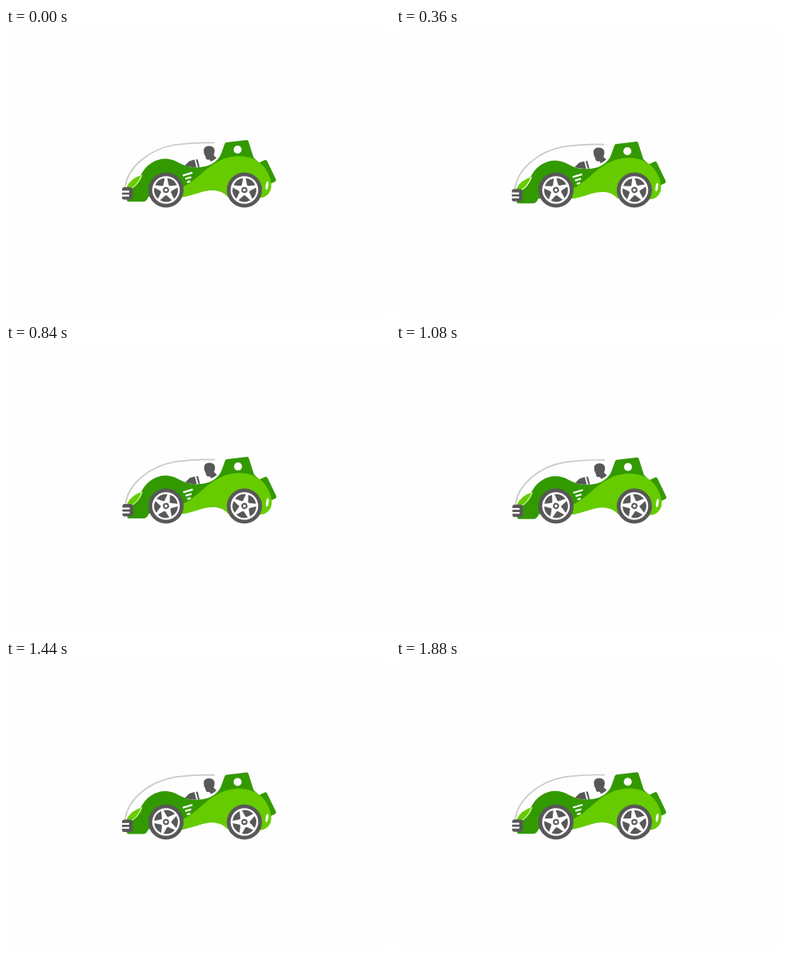
An HTML page that plays this animation: 480 by 360 pixels, repeating every 1.92 s.

```html
<!DOCTYPE html>
<html lang="en">
<head>
<meta charset="utf-8">
<title>Green car</title>
<style>
  html, body { margin: 0; width: 100%; height: 100%; overflow: hidden; background: #fefefe; }
  svg { display: block; width: 100vw; height: 100vh; }
</style>
</head>
<body>
<svg viewBox="0 0 480 360">
  <defs>
    <g id="rim">
      <circle r="17.300" fill="#fefefe"/>
      <g id="gaps" fill="#585858"></g>
      <circle r="3.800" fill="#585858"/>
      <circle r="1.800" fill="#fefefe"/>
    </g>
  </defs>

  <g id="body">
    <path fill="#339900" d="M316 168.500 L323.500 165 Q325.500 164.500 326.500 166.500 L337.300 189 Q338 191 336.500 192 L331 194.500 Z"/>
    <path fill="#339900" d="M151 215 L158 199.500 Q163 197 167 188 C173 171 187 163.500 199 163.500 C214 163.500 218 173 234 174 C254 175.500 265 167 269 157 L273.500 144.500 Q274 143.300 275.500 143 L301 140 Q302.500 140 303 141.500 L309.500 162 L316 168 L318 190 L250 203 L222 211 L178 211 Q176 217 171 217 L153 217 Q151 217 151 215 Z"/>
    <path fill="#66cc00" d="M220 199 C238 192 248 174 270 164.500 C292 156 312 161 322 173 C330 183 333 194 331 202 Q328 210 320 212 L277 211 Q271 204 261 203 C246 202 237 209 220 211.500 Z"/>
    <path fill="#66cc00" d="M150 200 Q156 187 171 183.500 Q166 197 157.500 200 Z"/>
    <path fill="none" stroke="#fefefe" d="M156.500 200.300 Q164 197.500 169.500 184"/>
    <path fill="none" stroke="#c9c9c5" stroke-width="1.700" stroke-linecap="round" d="M149 198 C152 176 176 152 211 146 Q236 142.500 260 143.500"/>

    <g fill="#585858">
      <path d="M223.500 172 L229 166.500 L235.500 164.500 L238 174 Q229 174 223.500 172 Z"/>
      <path d="M237.300 164.500 L239.500 164 L242 173.500 L240 174 Z"/>
      <path d="M247.300 154 C246.500 149 251 147.300 254.500 147.500 C260 147.800 261.500 152 260.500 156 L259.500 159 L263.200 162.500 Q259 166 256 167 L254.500 164.500 Q249.500 165.300 249.500 161 L247.600 157 Z"/>
      <path d="M147 199 L156 199 Q158.300 199.500 158.300 202 L158.300 211 Q158.300 214 155.500 214.500 L147 214.500 Q145 214.300 145 212 L145 201.500 Q145 199.500 147 199 Z"/>
    </g>
    <path fill="none" stroke="#fefefe" stroke-width="2.300" d="M144 204.500 H154 M144 209.500 H154 M221 184.300 L233 180.800 M224 188.500 L231.500 186.300 M226.200 192.800 L230.500 191.400"/>
    <ellipse fill="#fefefe" cx="326.200" cy="197" rx="1.600" ry="5.300" transform="rotate(8 326.200 197)"/>
    <circle fill="#fefefe" cx="289.500" cy="152" r="5"/>
  </g>

  <g fill="#585858">
    <circle cx="200" cy="202.500" r="22"/>
    <circle cx="298" cy="202.500" r="22"/>
  </g>
  <use class="wheel" href="#rim" data-x="200"/>
  <use class="wheel" href="#rim" data-x="298"/>
</svg>

<script>
  const LOOP = 1920, STEP = 40, AXLE_Y = 202.5;
  const body = document.getElementById("body");
  const wheels = document.querySelectorAll(".wheel");

  // Suspension poses: time, sideways shift, drop, tilt in degrees
  const poses = [
    [0, 0, 0, 0],
    [200, -1, 1.7, -0.2],
    [520, 0.5, 2.4, 0],
    [840, 0.5, 1.1, 0],
    [1080, 0.5, 1.7, 0],
    [1440, 0, 0.4, 0],
    [1880, 0.2, 0.2, 0],
    [LOOP, 0, 0, 0]
  ];

  // Five wedges leave a star of tapering spokes
  const gap = "M-0.8 -6.8 L-7.4 -12.8 Q0 -17.2 7.4 -12.8 L0.8 -6.8 Z";
  document.getElementById("gaps").innerHTML = Array.from({ length: 5 },
    (_, i) => `<path d="${gap}" transform="rotate(${36 + i * 72})"/>`).join("");

  function poseAt(t) {
    const i = poses.findIndex(p => p[0] > t);
    const a = poses[i - 1], b = poses[i];
    const u = (t - a[0]) / (b[0] - a[0]);
    const ease = u * u * (3 - 2 * u);
    return a.slice(1).map((v, k) => v + (b[k + 1] - v) * ease);
  }

  function draw(time) {
    const t = Math.floor((time % LOOP) / STEP) * STEP;
    const [dx, dy, tilt] = poseAt(t);
    body.setAttribute("transform", `translate(${dx} ${dy}) rotate(${tilt} 260 185)`);
    const turn = 360 * t / LOOP;
    wheels.forEach(w =>
      w.setAttribute("transform", `translate(${w.dataset.x} ${AXLE_Y}) rotate(${turn})`));
  }

  const start = performance.now();
  function tick() {
    draw(performance.now() - start);
    requestAnimationFrame(tick);
  }
  tick();
</script>
</body>
</html>
```
